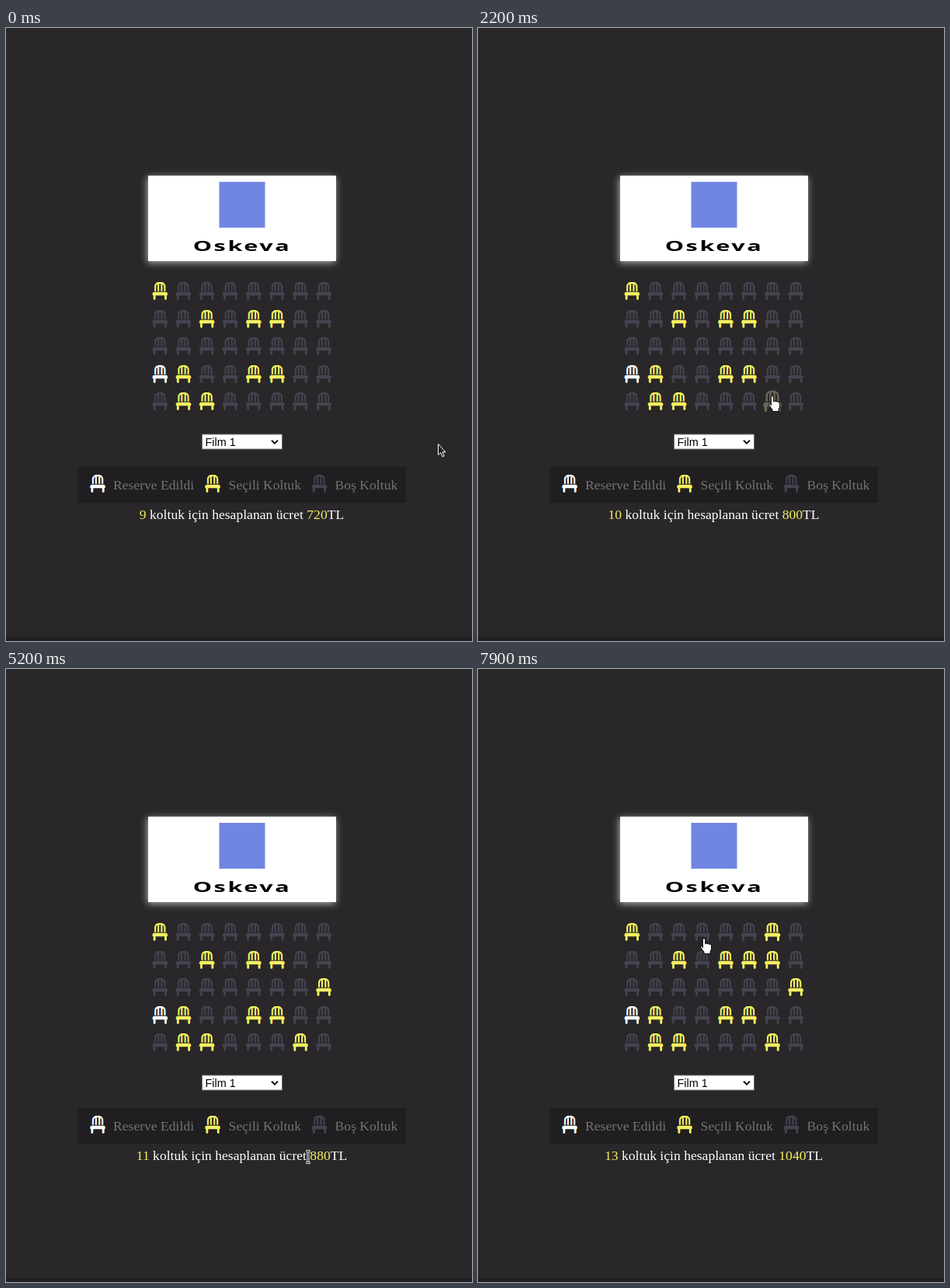
These frames come from a looping animation (600x789 px, 8000 ms). An HTML page with a canvas:

```html
<!DOCTYPE html>
<html lang="tr">
<head>
<meta charset="utf-8">
<title>Koltuk seçimi</title>
<style>
  html, body { margin: 0; width: 100%; height: 100%; overflow: hidden; background: #292729; }
  canvas, svg { position: absolute; left: 0; top: 0; display: block; }
  .banner {
    position: absolute; left: 183px; top: 190px; width: 242px; height: 110px;
    background: #fff; box-shadow: -1px 2px 9px rgba(255, 255, 255, .65);
  }
  text { font: 17.6px "Liberation Serif", "Times New Roman", serif; }
  .legend { fill: #747274; }
  .fee { fill: #fff; text-anchor: middle; }
  .fee .num { fill: #f4f060; }
  .brand { font: 700 18px "Open Sans", sans-serif; letter-spacing: 1.5px; text-anchor: middle; }
  .option { font: 14.4px "Liberation Sans", Arial, sans-serif; }
</style>
</head>
<body>
<canvas id="stage" width="600" height="789"></canvas>
<div class="banner"></div>
<svg width="600" height="789" viewBox="0 0 600 789">
  <rect x="274.5" y="198" width="59" height="59" fill="#7186e2"/>
  <text class="brand" transform="translate(304 287) scale(1.7 1)">Oskeva</text>

  <rect x="252.5" y="523" width="103" height="19" fill="#fff" stroke="#767676"/>
  <text class="option" x="256.5" y="538">Film 1</text>
  <path d="M342 530.7l4 4 4-4" fill="none" stroke="#111" stroke-width="2"/>

  <g class="legend">
    <text x="138" y="594">Reserve Edildi</text>
    <text x="286.6" y="594">Seçili Koltuk</text>
    <text x="423.6" y="594">Boş Koltuk</text>
  </g>
  <text class="fee" x="303.5" y="632"><tspan class="num" id="count">9</tspan> koltuk için hesaplanan ücret <tspan class="num" id="price">720</tspan>TL</text>

  <g id="cursor">
    <path id="arrow" d="M.5 .5V14.5L3.7 11.6 6 16.8 8.2 15.8 6 10.8H9.9Z" fill="#222" stroke="#fff"/>
    <path id="hand" transform="translate(1 0) scale(1.08)" d="M-1.5 11V1.3a1.5 1.5 0 0 1 3 0V6q1-1 2.7 .3q1-.6 2.4 .5q1.7-.6 2.2 1V12q0 2-1.3 3.6V18H0V16q-2-2-4.5-6.2q1-1.8 3 .5Z" fill="#fff" stroke="#111"/>
    <g id="beam" fill="none">
      <path d="M-3-7.5H3M0-7.5V7.5M-3 7.5H3" stroke="#ddd" stroke-width="3"/>
      <path d="M-3-7.5H3M0-7.5V7.5M-3 7.5H3" stroke="#333"/>
    </g>
  </g>
</svg>
<script>
const LOOP = 8000, FADE = 500, STEP = 20, PICK_DELAY = 400, TICKET = 80;
const EM = 23, SEAT_W = EM * 448 / 512;
const BG = [41, 39, 41], PANEL = [32, 30, 32];
const EMPTY = [68, 68, 81], YELLOW = [244, 240, 96], WHITE = [255, 255, 255];

const byId = id => document.getElementById(id);
const rgb = c => `rgb(${c.map(Math.round)})`;
const clamp = v => Math.max(0, Math.min(1, v));
const mix = (a, b, k) => a + (b - a) * k;
const ease = k => k * k * (3 - 2 * k);
const ctx = byId('stage').getContext('2d');

// Chair in a 448 x 512 box: arched back with slats, seat, two legs
const chair = new Path2D(
  'M248 48V262H296V58.7C320 72.5 336 98.4 336 128V262H384V128C384 57.3 326.7 0 256 0H192' +
  'C121.3 0 64 57.3 64 128V262H112V128C112 98.4 128 72.5 152 58.7V262H200V48Z' +
  'M48 282Q28 282 19 304L3 338Q-5 376 32 384V480A32 32 0 0 0 96 480V384H352V480' +
  'A32 32 0 0 0 416 480V384Q453 376 445 338L429 304Q420 282 400 282Z');

// y: selected, r: reserved, dot: empty
const hall = ['y.......', '..y.yy..', '........', 'ry..yy..', '.yy.....'];
const fills = { y: YELLOW, r: WHITE, '.': EMPTY };

const seats = hall.flatMap((line, row) => [...line].map((mark, col) => ({
  x: 198.3 + col * (SEAT_W + 10),
  y: Math.round(338.4 + row * 35.5) + .5,
  base: fills[mark],
  fringe: row > 0 && mark !== '.',
  pickedAt: Infinity
})));

const stop = (arrive, hold, x, y) => ({ arrive, leave: arrive + hold, x, y });

// Resting long enough on a seat picks it
function visit(arrive, hold, col, row) {
  const seat = seats[row * 8 + col];
  if (hold > PICK_DELAY) seat.pickedAt = arrive + PICK_DELAY;
  return stop(arrive, hold, seat.x - 1, seat.y - 7);
}

const tour = [
  stop(0, 0, 556, 535),
  stop(800, 0, 422, 535),
  visit(1700, 650, 6, 4),
  visit(2800, 300, 7, 4),
  stop(3200, 0, 416, 442),
  visit(3550, 450, 7, 2),
  stop(4500, 700, 389, 628),
  visit(6050, 650, 6, 1),
  visit(6900, 500, 6, 0),
  stop(7700, 0, 335, 358),
  stop(7900, 100, 290, 347)
];

function pointer(t) {
  const i = tour.findIndex(s => s.leave >= t);
  const to = tour[i], from = tour[Math.max(0, i - 1)];
  const k = t < to.arrive ? ease(clamp((t - from.leave) / (to.arrive - from.leave))) : 1;
  return { x: mix(from.x, to.x, k), y: mix(from.y, to.y, k) };
}

const over = (s, p) => Math.abs(p.x - s.x) < SEAT_W / 2 && Math.abs(p.y - s.y) < EM / 2;

function fillChair(x, y, scale, color) {
  const k = EM / 512 * scale;
  ctx.setTransform(k, 0, 0, k, x - 224 * k, y - 256 * k);
  ctx.fillStyle = rgb(color);
  ctx.fill(chair);
  ctx.resetTransform();
}

// Each colour channel is offset by a third of a pixel, as in subpixel text
function fringedChair(x, y, color, bg) {
  ctx.globalCompositeOperation = 'lighter';
  for (let c = 0; c < 3; c++) {
    const part = [0, 0, 0];
    part[c] = color[c] - bg[c];
    fillChair(x + (1 - c) / 3, y, 1, part);
  }
  ctx.globalCompositeOperation = 'source-over';
}

// Hovered seats grow and shrink linearly, picked seats fade to yellow
function drawSeats(t) {
  const trail = [];
  for (let d = 0; d < FADE; d += STEP) trail.push(pointer(Math.max(0, t - d)));
  for (const s of seats) {
    const hover = trail.filter(p => over(s, p)).length / trail.length;
    const k = clamp((t - s.pickedAt) / FADE);
    const color = s.base.map((v, i) => mix(v, YELLOW[i], k));
    if (s.fringe && !hover) fringedChair(s.x, s.y, color, BG);
    else fillChair(s.x, s.y, 1 + .2 * hover, color);
  }
}

function inBox(el, p) {
  const b = el.getBBox();
  return p.x >= b.x && p.x <= b.x + b.width && p.y >= b.y && p.y <= b.y + b.height;
}

const labels = [...document.querySelectorAll('.legend text, .fee')];

function drawCursor(t) {
  const p = pointer(t);
  const kind = seats.some(s => over(s, p)) ? 'hand'
    : labels.some(el => inBox(el, p)) ? 'beam' : 'arrow';
  for (const id of ['arrow', 'hand', 'beam']) byId(id).style.display = id === kind ? '' : 'none';
  byId('cursor').setAttribute('transform', `translate(${Math.round(p.x)} ${Math.round(p.y)})`);
}

function drawPanels() {
  ctx.fillStyle = rgb(BG);
  ctx.fillRect(0, 0, 600, 789);
  ctx.fillStyle = rgb(PANEL);
  ctx.fillRect(92, 565, 423, 46);
  ctx.fillRect(0, 784, 600, 5);
  fringedChair(118, 586.5, WHITE, PANEL);
  fringedChair(266, 586.5, YELLOW, PANEL);
  fillChair(403.5, 586.5, 1, EMPTY);
}

function render(t) {
  const count = seats.filter(s => s.base === YELLOW || s.pickedAt <= t).length;
  byId('count').textContent = count;
  byId('price').textContent = count * TICKET;
  drawPanels();
  drawSeats(t);
  drawCursor(t);
}

const start = performance.now();
function tick() {
  render((performance.now() - start) % LOOP);
  requestAnimationFrame(tick);
}
tick();
</script>
</body>
</html>
```
